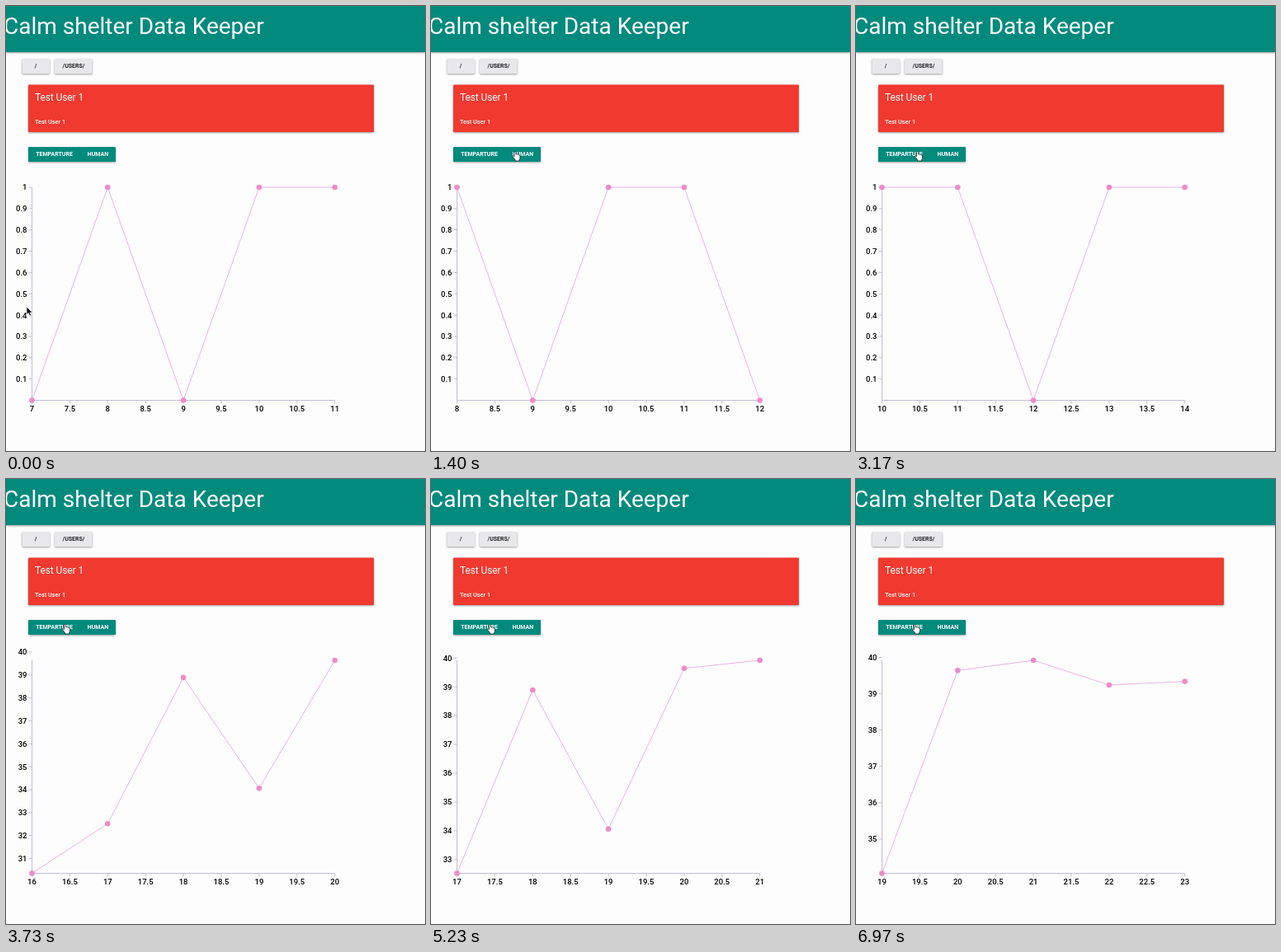
Write an HTML page that moves like this. It is 508x540 px and loops after 7.01 s.

```html
<!DOCTYPE html>
<html lang="en">
<head>
<meta charset="utf-8">
<style>
  html, body { margin: 0; width: 100%; height: 100%; overflow: hidden; background: #fdfdfd; }
  svg { display: block; width: 508px; height: 540px; font-family: Roboto, sans-serif; }
  .raised { filter: drop-shadow(0 1px 1.2px rgba(0, 0, 0, .38)); }
  .teal { fill: #028a7d; }
  .btn { font-size: 7px; font-weight: 700; text-anchor: middle; }
  #chart { font-size: 9.5px; font-weight: 500; }
  #chart path { fill: none; stroke: #c2bcd8; }
  #chart .line { stroke: #e8b2ea; }
  #chart circle { fill: #ee8acb; }
  .cursor path { stroke-linejoin: round; }
</style>
</head>
<body>
<svg viewBox="0 0 508 540">
  <rect width="508" height="56" class="teal raised"/>
  <text x="-3" y="34" font-size="28" fill="#fff">Calm shelter Data Keeper</text>

  <g class="raised" fill="#e8e8ea">
    <rect x="19.500" y="64" width="33.500" height="18" rx="1"/>
    <rect x="59" y="64" width="45.500" height="18" rx="1"/>
  </g>
  <g class="btn" fill="#222">
    <text x="36" y="75.300">/</text>
    <text x="82" y="75.300">/USERS/</text>
  </g>

  <rect x="27" y="95.500" width="419" height="57.500" rx="1" fill="#f0392f" class="raised"/>
  <g fill="#fff">
    <text x="35" y="115" font-size="12" letter-spacing="-.1">Test User 1</text>
    <text x="35" y="142.500" font-size="7.300" font-weight="500">Test User 1</text>
  </g>

  <rect x="27" y="171" width="106" height="18" rx="1" class="teal raised"/>
  <g class="btn" fill="#fff">
    <text x="58.500" y="182">TEMPARTURE</text>
    <text x="111.500" y="182">HUMAN</text>
  </g>

  <g id="chart"></g>

  <g id="arrow" class="cursor">
    <path d="M0 0V9.500L2.200 7.500 3.800 11 5.500 10.200 4 7H7Z" fill="#111" stroke="#fff" stroke-width=".6"/>
  </g>
  <g id="hand" class="cursor">
    <path d="M-1 1Q0-1 1 1V4Q2 3.200 2.800 4.300 3.700 3.600 4.400 4.800 5.800 4.300 6 6V8Q6 9.500 5 10.500V12H0V10.500L-3.200 6.800Q-3 5-1 6.500Z" fill="#fff" stroke="#222" stroke-width=".8"/>
  </g>
</svg>

<script>
const LOOP = 7010, LEFT = 31.5, TOP = 220, BOTTOM = 478.5, STEP = 91.8;
const $ = id => document.getElementById(id);

const human = { start: 7, unit: .1, values: [0, 1, 0, 1, 1, 0, 1, 1] };
const temperature = { start: 16, unit: 1,
  values: [30.355, 32.52, 38.89, 34.06, 39.64, 39.92, 39.24, 39.34] };

// time, x, y of the pointer's hot spot
const route = [[0, 25, 365], [550, 25, 365], [1150, 102, 176],
  [2850, 102, 176], [3250, 71.5, 176], [LOOP, 71.5, 176]];

function drawChart({ start, unit, values }, first) {
  const shown = values.slice(first, first + 5);
  const min = Math.min(...shown), max = Math.max(...shown);
  const x = i => LEFT + i * STEP;
  const y = v => BOTTOM - (v - min) / (max - min) * (BOTTOM - TOP);
  let axes = `M${LEFT} ${TOP}V${BOTTOM}H${x(4)}`, labels = '', dots = '';

  for (let n = Math.floor(min / unit) + 1; n <= Math.ceil(max / unit); n++) {
    const py = y(n * unit);
    axes += `M${LEFT - 4} ${py}h4`;
    labels += `<text x="25.5" y="${py + 3.4}" text-anchor="end">${+(n * unit).toFixed(1)}</text>`;
  }
  for (let i = 0; i <= 4; i += .5) {
    axes += `M${x(i)} ${BOTTOM}v4`;
    labels += `<text x="${x(i)}" y="492" text-anchor="middle">${start + first + i}</text>`;
  }
  shown.forEach((v, i) => dots += `<circle cx="${x(i)}" cy="${y(v)}" r="3.3"/>`);
  const line = 'M' + shown.map((v, i) => `${x(i)} ${y(v)}`).join('L');
  $('chart').innerHTML = `<path d="${axes}"/>${labels}<path class="line" d="${line}"/>${dots}`;
}

function moveCursor(t) {
  const k = route.findIndex(p => p[0] > t);
  const [t0, x0, y0] = route[k - 1], [t1, x1, y1] = route[k];
  const u = (t - t0) / (t1 - t0), e = u * u * (3 - 2 * u);
  const x = x0 + (x1 - x0) * e, y = y0 + (y1 - y0) * e;
  const over = x > 27 && x < 133 && y > 171 && y < 189;
  for (const [id, on] of [['arrow', !over], ['hand', over]]) {
    $(id).setAttribute('transform', `translate(${x} ${y})`);
    $(id).style.display = on ? '' : 'none';
  }
}

let lastTick = -1;
function frame() {
  const t = performance.now() % LOOP;
  const tick = Math.floor((t + 500) / 1000); // one new reading each second
  if (tick !== lastTick) {
    lastTick = tick;
    if (tick < 4) drawChart(human, tick);
    else drawChart(temperature, Math.min(tick - 4, 3));
  }
  moveCursor(t);
  requestAnimationFrame(frame);
}
frame();
</script>
</body>
</html>
```
